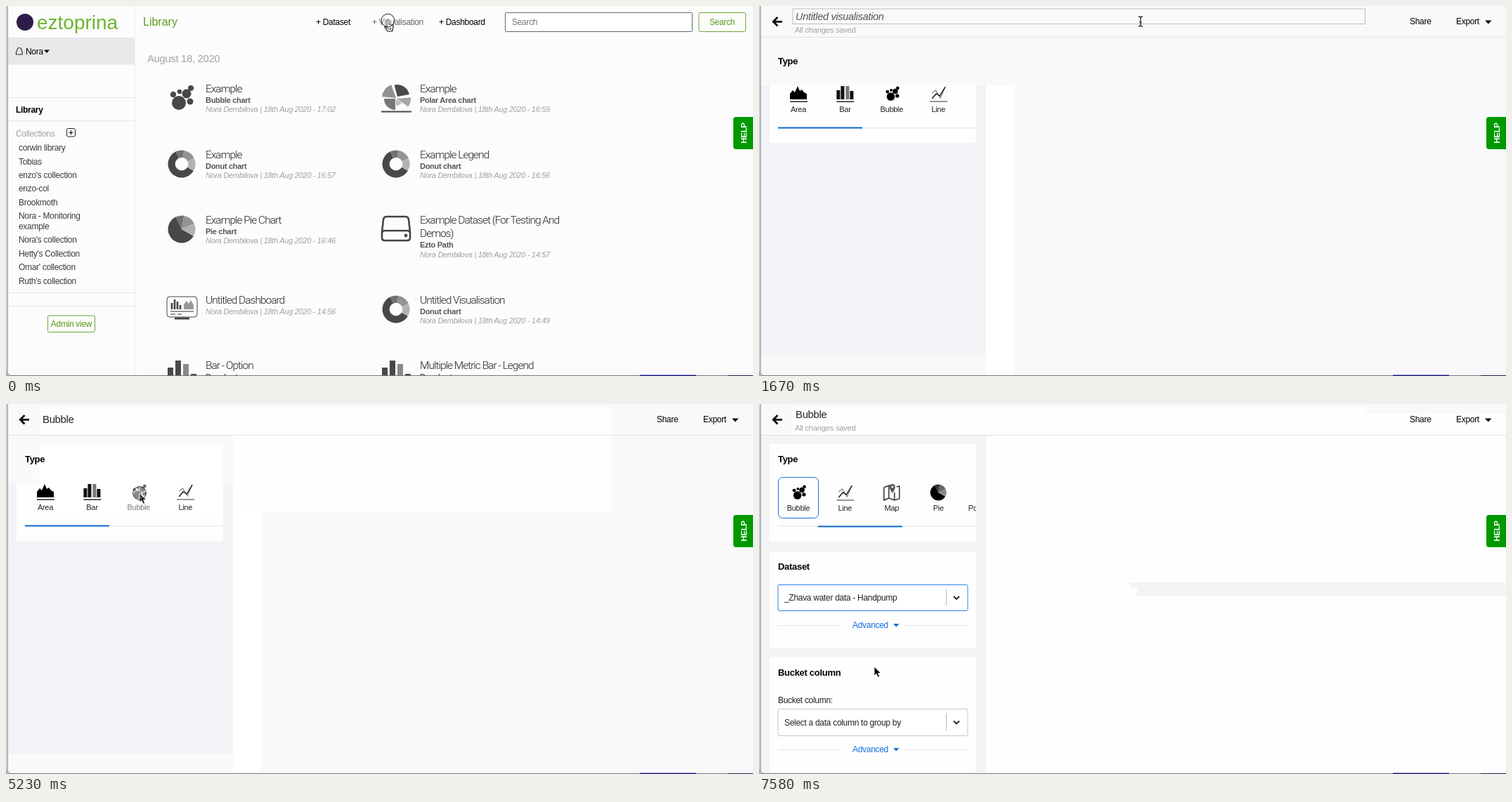
Animation, 1063 px wide and 527 px high, one loop 8 s. Source, as an HTML page:

```html
<!DOCTYPE html>
<html lang="en">
<head>
<meta charset="utf-8">
<title>Creating a bubble chart</title>
<style>
html, body { margin: 0; width: 100%; height: 100%; overflow: hidden; background: #fbfbfc; }
svg { display: block; width: 100%; height: 100%; }
text { font: 12px "Liberation Sans", Arial, sans-serif; letter-spacing: -.3px; fill: #222; white-space: pre; }
.b { font-weight: 700; }
.mid { text-anchor: middle; }
.s11 { font-size: 11px; }
.s13 { font-size: 13px; }
.nav { fill: #000; }
.side { fill: #3c3c3c; }
.green { fill: #5b9b1b; }
.grey { fill: #a3a3a3; }
.blue { fill: #146ee0; }
.head { font: 300 15.5px Roboto, "Liberation Sans", sans-serif; letter-spacing: -1px; fill: #222; }
.sub { font-weight: 700; font-size: 11px; fill: #555; }
.meta { font-style: italic; font-size: 11px; fill: #a0a0a0; }
.line { stroke: #e4e4e6; fill: none; }
</style>
</head>
<body>
<svg id="stage" viewBox="0 0 1063 527" preserveAspectRatio="none"></svg>
<script>
const LOOP = 8000;
const text = (x, y, str, cls = '', attrs = '') => `<text x="${x}" y="${y}" class="${cls}" ${attrs}>${str}</text>`;
const rect = (x, y, w, h, fill, attrs = '') => `<rect x="${x}" y="${y}" width="${w}" height="${h}" fill="${fill}" ${attrs}/>`;
const frame = (x, y, w, h, stroke, r = 0, fill = 'none') => rect(x, y, w, h, fill, `stroke="${stroke}" rx="${r}"`);
const path = (d, attrs = '') => `<path d="${d}" ${attrs}/>`;
const hline = (x1, x2, y) => path(`M${x1} ${y}H${x2}`, 'class="line"');
const at = (x, y, body, scale = 1) => `<g transform="translate(${x} ${y}) scale(${scale})">${body}</g>`;
// Visible from one time up to another
const during = (from, to, body) => `<g data-on="${from} ${to}">${body}</g>`;

function wedge(r, from, to, fill) {
  const point = deg => {
    const a = (deg - 90) * Math.PI / 180;
    return `${(r * Math.cos(a)).toFixed(2)} ${(r * Math.sin(a)).toFixed(2)}`;
  };
  return path(`M0 0L${point(from)}A${r} ${r} 0 ${to - from > 180 ? 1 : 0} 1 ${point(to)}Z`, `fill="${fill}"`);
}
const wedges = (r, colors) => [[120, 335], [335, 370], [10, 65], [65, 120]]
  .map(([a, b], i) => wedge(r, a, b, colors[i])).join('');
const greys = ['#484848', '#727272', '#949494', '#b2b2b2'];

const icons = {
  bubble: [[-4, 7, 10], [7, -6, 6.5], [-12, -5, 4.2], [-3, -9, 3.2], [13, -14, 4], [12, 5, 4.5]]
    .map(([x, y, r]) => `<circle cx="${x}" cy="${y}" r="${r}"/>`).join(''),
  donut: wedges(19.5, greys) + '<circle r="9.3" fill="#fcfcfc"/>',
  pie: wedges(19.5, greys),
  polar: wedge(20, 275, 340, '#929292') + at(2, -2, wedge(17, 345, 440, '#4a4a4a')) +
    at(1, 1, wedge(20, 85, 125, '#a5a5a5')) + at(0, 1, wedge(10, 125, 180, '#c0c0c0')) +
    at(-1, 1, wedge(16, 180, 270, '#777')) + rect(-21, 18.5, 43, 2, '#484848'),
  drive: path('M-14-18H14Q17-18 18-14L20 4V12Q20 16 16 16H-16Q-20 16-20 12V4L-18-14Q-17-18-14-18ZM-20 6Q-20 2-16 2H16Q20 2 20 6',
    'fill="none" stroke="#444" stroke-width="2.6"') + '<circle cx="14" cy="9" r="2.4"/>',
  dashboard: frame(-21, -18, 43, 29, '#444', 4) + path('M-10 13H11', 'stroke="#444" stroke-width="3"') +
    path('M-14 0V-9M-10 0V-14M-6 0V-11M-2 0V-6', 'stroke="#444" stroke-width="2.6"') +
    path('M3 0V-7L7-12 10-8 13-13 17-6V0Z', 'fill="#999"') +
    path('M-16 3H17M-16 7H-9M-6 7H0', 'stroke="#777" stroke-width="1.3"'),
  bars: rect(-20, -10, 8, 40, '#484848') + rect(-9, -20, 8, 50, '#484848') +
    rect(2, -15, 8, 45, '#8a8a8a') + rect(13, -1, 8, 30, '#484848'),
};

const tools = [
  ['Area', path('M-12 8V0L-8-5-5-2-1-11 2-4 5-6 8-2 12 0V8Z') + rect(-12, 10.5, 25, 1.3, '#000')],
  ['Bar', rect(-12, -5, 5, 13, '#111') + rect(-6, -11, 5, 19, '#111') + rect(1, -11, 5, 19, '#777') +
    rect(7, -4, 5, 12, '#111') + rect(-12, 10.5, 25, 1.3, '#000')],
  ['Bubble', at(1, 0, icons.bubble, .58)],
  ['Line', path('M-9-1L-4-5 3 6 9-8', 'fill="none" stroke="#888" stroke-width="1.3"') +
    path('M-9 7L-3 0 2 3 10-10', 'fill="none" stroke="#111" stroke-width="1.4"') + rect(-12, 10.5, 25, 1, '#333')],
  ['Map', path('M-11-7L-4-10 3-8M7-8L11-9V9L4 11-4 8-11 11V-7M-4-10V8M4 0V11', 'fill="none" stroke="#333" stroke-width="1.5"') +
    path('M1 1Q-3-5-3-8A4 4 0 0 1 5-8Q5-5 1 1Z', 'fill="#555"') + '<circle cx="1" cy="-8" r="1.5" fill="#fff"/>'],
  ['Pie', wedges(11.5, ['#000', '#333', '#666', '#8a8a8a'])],
  ['Polar area', at(0, 0, icons.polar, .55)],
];

// ---- Library page
const owner = 'Nora Dembilova';
function entry(x, y, icon, title, kind, time) {
  const lines = [].concat(title);
  const last = y + (lines.length - 1) * 19.8;
  return at(x - 34, y + 14, icons[icon]) +
    lines.map((s, i) => text(x, y + 5.5 + i * 19.8, s, 'head')).join('') +
    (kind ? text(x, last + 20.5, kind, 'sub') : '') +
    text(x, last + (kind ? 34 : 20.5), `${owner} | 18th Aug 2020 - ${time}`, 'meta');
}
const collections = [[202, 'corwin library'], [222, 'Tobias'], [241, "enzo's collection"], [260, 'enzo-col'],
  [279.5, 'Brookmoth'], [299, 'Nora - Monitoring'], [314, 'example'], [333, "Nora's collection"],
  [353, "Hetty's Collection"], [372, "Omar' collection"], [392, "Ruth's collection"]];

const library = rect(0, 0, 1063, 527, '#fcfcfc') +
  rect(183, 0, 1, 527, '#ececec') + rect(3, 45, 180, 38.5, '#e8e8e8') +
  '<circle cx="27" cy="23" r="12" fill="#2e1b47"/>' +
  text(44, 33, 'eztoprina', '', 'style="font-size:28px;letter-spacing:0;fill:#6cb52d"') +
  path('M16 63A3 3.5 0 1 1 22 63L23 65V69H14.500V65Z', 'fill="none" stroke="#333" stroke-width="1.2"') +
  text(28, 68.5, 'Nora', 'nav') + path('M54 62.500H62L58 67Z') +
  [131, 164, 409, 428].map(y => hline(3, 183, y + .5 - 1)).join('') +
  text(14, 152, 'Library', 'b nav') + text(14, 185.5, 'Collections', 'grey') +
  frame(86.5, 174.5, 12, 11.500, '#222', 2) + path('M89.500 180.300H95.500M92.500 177.300V183.300', 'stroke="#222" stroke-width="1.3"') +
  collections.map(([y, s]) => text(18, y + 4, s, 'side')).join('') +
  frame(59.5, 441, 67, 23.5, '#6aa636', 2) + text(93, 456.5, 'Admin view', 'green mid') +
  text(195, 28, 'Library', 'green', 'style="font-size:16px;letter-spacing:0"') +
  text(441, 27, '+ Dataset', 'nav') + text(521, 27, '+ Visualisation', '', 'style="fill:#666"') + text(616, 27, '+ Dashboard', 'nav') +
  frame(710.5, 9.5, 266, 27, '#666', 1, '#fff') + text(720, 27, 'Search', '', 'style="fill:#757575"') +
  frame(986, 9.5, 66.5, 27, '#6aa636', 2) + text(1019, 27, 'Search', 'green mid') +
  text(201, 79.500, 'August 18, 2020', 'grey', 'style="font-size:14.8px"') +
  '<g fill="#484848">' +
  entry(284, 117, 'bubble', 'Example', 'Bubble chart', '17:02') +
  entry(589, 117, 'polar', 'Example', 'Polar Area chart', '16:59') +
  entry(284, 211, 'donut', 'Example', 'Donut chart', '16:57') +
  entry(589, 211, 'donut', 'Example Legend', 'Donut chart', '16:56') +
  entry(284, 304, 'pie', 'Example Pie Chart', 'Pie chart', '16:46') +
  entry(589, 304, 'drive', ['Example Dataset (For Testing And', 'Demos)'], 'Ezto Path', '14:57') +
  entry(284, 418, 'dashboard', 'Untitled Dashboard', '', '14:56') +
  entry(589, 418, 'donut', 'Untitled Visualisation', 'Donut chart', '14:49') +
  entry(284, 511, 'bars', 'Bar - Option', 'Bar chart', '14:40') +
  entry(589, 511, 'bars', 'Multiple Metric Bar - Legend', 'Bar chart', '14:32') + '</g>';

// ---- Editor page
const chevron = y => path(`M277 ${y - 2}L281 ${y + 2} 285 ${y - 2}`, 'fill="none" stroke="#222" stroke-width="1.8"');
const selectBox = (y, h, id) => frame(27, y, 270, h, '#c6c6c6', 2, '#fff').replace('<rect', `<rect id="${id}"`) +
  path(`M266.500 ${y + 6}V${y + h - 7}`, 'stroke="#bbb"') + chevron(y + h / 2);
const advanced = y => hline(27, 117, y + .5) + hline(206, 297, y + .5) +
  text(133, y + 4, 'Advanced', 'blue') + path(`M191 ${y - 2}H199.500L195.200 ${y + 2.500}Z`, 'class="blue"');
const card = (y, h) => rect(15, y, 294, h, '#fefefe', 'rx="3"');
const titleText = 'style="font-size:14.9px"';
const saved = text(51, 38, 'All changes saved', 'grey', 'style="font-size:11.3px"');

const toolList = '<g clip-path="url(#toolClip)"><g id="tools">' +
  tools.map(([name, icon], i) => {
    const x = 56 + i * 66.4;
    return `<g id="tool${i}">` + (i === 2 ? during(5370, LOOP, frame(x - 28.5, 103.5, 57, 58, '#1b6fd6', 6)) : '') +
      at(x, 125, icon) + text(x, 150.5, name, 's11 mid') + '</g>';
  }).join('') + '</g>' + rect(27, 173, 282, 1.5, '#ececee') +
  rect(27, 172.5, 120, 2, '#0f6bd0', 'id="underline"') + '</g>';

const options = ['__enzo-primary-import-R&amp;D baseline', '_*mgeo', '_Zhava water data - Handpump',
  '_mgeo_apos', '_mock_hamsters', '_tilo_testcase'];
const chosen = options[2];

const editor = rect(0, 0, 1063, 527, '#f9f9fb') +
  during(1520, 5370, rect(3, 113, 320, 385, '#f3f3f7') + rect(323, 113, 40, 414, '#fff') + card(113, 82)) +
  during(5230, 5370, rect(48, 4, 814, 40, '#fefefe') + rect(323, 45, 539, 108, '#fefefe') +
    rect(15, 57, 294, 60, '#fafafc', 'rx="3"') + rect(48, 57, 261, 96, '#fff')) +
  during(5370, LOOP, rect(3, 45, 320, 481, '#f4f4f7') + rect(323, 45, 740, 481, '#fefefe') + rect(48, 4, 814, 40, '#fefefe') +
    rect(862, 14, 201, 30, '#fefefe') + card(57, 139) + card(210, 137)) +
  during(5520, LOOP, path('M526 254H1063V273H537Q533 270 536 267H539V262H529Z', 'fill="#f4f4f6"')) +
  rect(3, 44, 1060, 1, '#e2e2e4') +
  path('M33 22.300H21M26.500 16L20.300 22.300 26.500 28.600', 'fill="none" stroke="#111" stroke-width="2.8"') +
  text(926, 26, 'Share', 'nav') + text(992, 26, 'Export', 'nav') + path('M1033 20.500H1042.500L1037.800 25.500Z') +
  during(1080, 2410, frame(48, 4, 814.5, 21.5, '#bdbdbd') +
    text(52, 20, 'Untitled visualisation', '', 'style="font-size:14.5px;font-style:italic;fill:#555"') + saved) +
  during(2410, 5230, frame(48, 7, 814, 30.5, '#555', 1, '#fefefe') +
    text(52, 28, '', '', 'id="typed" style="font-size:17px;letter-spacing:0;fill:#444"') + rect(52, 13, 1, 19, '#333', 'id="caret"')) +
  during(5230, 5520, text(52, 27, 'Bubble', '', titleText)) +
  during(5520, LOOP, text(52, 20, 'Bubble', '', titleText) + saved) +
  text(27, 82.5, 'Type', 'b s13 nav') +
  during(1080, 1520, rect(27, 127, 1, 1, '#555')) +
  during(1520, LOOP, toolList) +
  during(5670, 6110, rect(84, 164, 117, 6, '#7d7d7d', 'rx="3"')) +
  during(5370, LOOP, text(27, 235.5, 'Dataset', 'b s13 nav') + selectBox(257.5, 37, 'datasetBox') + advanced(315)) +
  during(5370, 7430, text(36, 280, 'Choose dataset')) +
  during(6400, 7430, rect(36, 269, 1, 15, '#222') + frame(27.5, 303.5, 269, 170.5, '#d0d0d0', 0, '#fff') +
    rect(28, 305, 268, 28, '#f0f1f1', 'id="hovered"') +
    options.map((s, i) => text(38, 323.5 + i * 28.25, s)).join('')) +
  during(7430, LOOP, text(36, 280, chosen)) +
  during(7580, LOOP, card(360, 165) + text(27, 387, 'Bucket column', 'b s13 nav') + text(27, 425.5, 'Bucket column:') +
    selectBox(434.5, 38, 'bucketBox') + text(36, 457.5, 'Select a data column to group by') + advanced(492));

const status = path('M2 507H351Q355 507 355 511V527H2Z', 'fill="#3a3b3d"') +
  text(7, 521, 'Waiting for prina.ezto.example...', '', 'style="font-size:11.5px;letter-spacing:0;fill:#dcdcdc"');

const chrome = rect(1035, 158, 32, 46, '#009a00', 'rx="4"') +
  text(0, 0, 'HELP', 'b mid', 'transform="translate(1053.5 181) rotate(-90)" style="font-size:11.5px;fill:#fff"') +
  rect(0, 0, 2, 527, '#c9c9c9') + rect(2, 0, 1, 527, '#a9a9a9') +
  path('M0 527V520H2.500Q3 526 9 526V527Z', 'fill="#b0b0b0"') +
  rect(5, 526, 1058, 1, '#77777c') + rect(902, 525.5, 80, 1.5, '#1c1c86') + rect(1027, 526, 36, 1, '#1c1c50');

const pointers = {
  hand: path('M-2 7V-3Q-2-5-.500-5T1-3V2L6 3.500Q7.500 4 7 6.500L5.500 12H-1L-5 6Q-5.500 4-4 4.500Z',
    'fill="#fff" stroke="#111" stroke-width="1.2"') + path('M1 7V10M3.500 7V10', 'stroke="#111"'),
  ibeam: path('M-3-7Q0-7 0-5Q0-7 3-7M0-6V6M-3 7Q0 7 0 5Q0 7 3 7M-1.500 1H1.500', 'fill="none" stroke="#222" stroke-width="1.3"'),
  arrow: path('M0 0V13L3 10.300 5.300 15.300 7.600 14.300 5.500 9.500H9.500Z', 'stroke="#fff" stroke-width=".9"'),
};

document.getElementById('stage').innerHTML =
  '<defs><clipPath id="toolClip"><rect x="27" y="95" width="282" height="90"/></clipPath></defs>' +
  during(0, 1080, library) + during(1080, LOOP, editor) +
  during(1230, 1670, status) + during(5520, 5670, status) + chrome +
  '<g id="pointer">' + Object.entries(pointers).map(([k, v]) => `<g id="${k}">${v}</g>`).join('') + '</g>' +
  '<circle id="ring" r="9.3" fill="#fff" fill-opacity=".25" stroke="#222"/>';

// ---- Timeline: each row holds until the next
const moves = [
  [0, 'hand', 544, 24], [1230, 'ibeam', 543, 22], [4330, 'ibeam', 520, 27], [4480, 'arrow', 445, 58],
  [4630, 'arrow', 345, 93], [4780, 'arrow', 255, 117], [4930, 'arrow', 207, 126], [5080, 'arrow', 191, 127],
  [5230, 'arrow', 190, 127], [5520, 'arrow', 189, 132], [5670, 'arrow', 187, 165], [5810, 'arrow', 183, 218],
  [5960, 'arrow', 182, 245], [6110, 'arrow', 181, 261], [6250, 'arrow', 180, 265],
  [6850, 'arrow', 178, 282], [7000, 'arrow', 171, 326], [7140, 'arrow', 165, 368], [7290, 'arrow', 164, 374]];
const clicks = [[0, 150, 543.5, 20.5], [2410, 2560, 543, 22], [5230, 5370, 190, 127], [6400, 6550, 181.5, 264.5], [7290, 7430, 164, 374]];
const typing = [[0, ''], [3000, 'B'], [3150, 'Bu'], [3300, 'Bubb'], [3440, 'Bubbl'], [4040, 'Bubble']];
const scrolls = [[0, 0], [5520, 66], [5670, 132.8]];

const $ = id => document.getElementById(id);
const latest = (table, t) => table.filter(row => row[0] <= t).pop();
const show = (el, on) => { el.style.display = on ? '' : 'none'; };
const timed = [...document.querySelectorAll('[data-on]')].map(el => [el, ...el.dataset.on.split(' ').map(Number)]);

function render(t) {
  for (const [el, from, to] of timed) show(el, t >= from && t < to);

  const [, shape, x, y] = latest(moves, t);
  for (const name in pointers) show($(name), name === shape);
  $('pointer').setAttribute('transform', `translate(${x} ${y})`);
  const click = clicks.find(([from, to]) => t >= from && t < to);
  show($('ring'), click);
  if (click) $('ring').setAttribute('transform', `translate(${click[2]} ${click[3]})`);

  $('typed').textContent = latest(typing, t)[1];
  if (t >= 2410 && t < 5230) $('caret').setAttribute('x', 52 + $('typed').getComputedTextLength());

  const scroll = latest(scrolls, t)[1];
  const drop = t >= 5370 ? 1 : 0;
  $('tools').setAttribute('transform', `translate(${-scroll} ${drop})`);
  $('underline').setAttribute('transform', `translate(${scroll * .428} ${drop})`);
  $('tool2').setAttribute('opacity', t >= 5080 && t < 5370 ? .6 : 1);
  $('tool4').setAttribute('opacity', t >= 5670 && t < 5960 ? .75 : 1);

  $('datasetBox').setAttribute('stroke', t >= 6400 ? '#2f80e8' : '#c6c6c6');
  $('hovered').setAttribute('y', t < 7140 ? 305 : 361.5);
}

const start = performance.now();
function tick() {
  render((performance.now() - start) % LOOP);
  requestAnimationFrame(tick);
}
tick();
</script>
</body>
</html>
```
